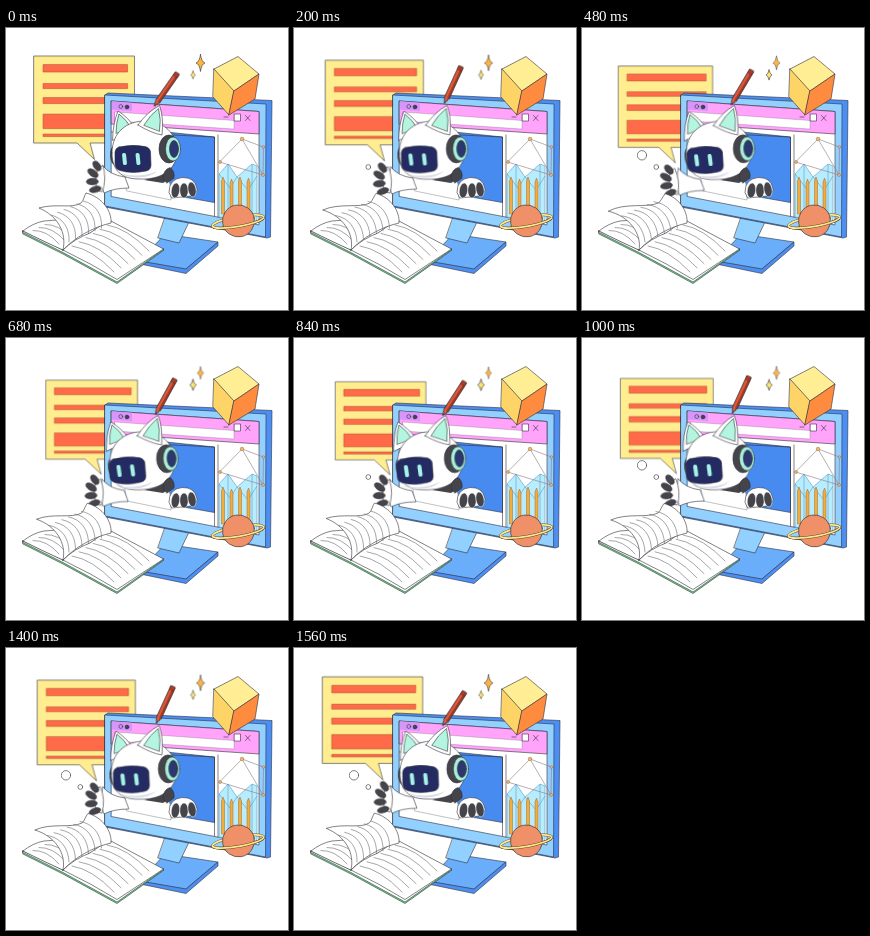
An HTML page for the animation above (1600 ms loop, 282 by 282 pixels).

```html
<!DOCTYPE html>
<html lang="en">
<head>
<meta charset="utf-8">
<title>Robot tutor</title>
<style>
html, body { margin: 0; width: 100%; height: 100%; overflow: hidden; background: #fff; }
svg { display: block; width: 100vw; height: 100vh; }
.ink { stroke: #30303a; stroke-width: .6; stroke-linejoin: round; stroke-linecap: round; }
.line { fill: none; stroke: #30303a; stroke-width: .6; stroke-linecap: round; }
.text { fill: none; stroke: #6b6b70; stroke-width: .6; stroke-linecap: round; }

/* slow drift back and forth */
.drift { animation: 800ms linear infinite alternate; }
#bubble { animation-name: bubble; transform-origin: 162px 183px; }
#head { animation-name: head; transform-origin: 155px 140px; }
#face { animation-name: face; }
#earL { animation-name: earL; }
#earR { animation-name: earR; }
#arm { animation-name: arm; }
#star { animation-name: shrink; transform-origin: 194.5px 35px; }
#spark { animation-name: grow; transform-origin: 187px 47px; }
@keyframes bubble { to { transform: scale(.893); } }
@keyframes head { to { transform: translateX(-2px) rotate(-2.5deg); } }
@keyframes face { to { transform: translate(-4px,.5px); } }
@keyframes earL { to { transform: translate(-4px,-1px); } }
@keyframes earR { to { transform: translate(3px,0); } }
@keyframes arm { to { transform: translate(-1px,4px); } }
@keyframes shrink { to { transform: scale(.68); } }
@keyframes grow { from { transform: scale(.8); } to { transform: scale(1.15); } }

/* twice as fast */
.flap { animation: 400ms linear infinite alternate; }
#hand { animation-name: wave; transform-origin: 99px 152px; }
#leaf { animation-name: leaf; }
.row { animation-name: row; }
@keyframes wave { from { transform: rotate(4deg); } to { transform: translateX(-2px) rotate(-6deg); } }
@keyframes leaf {
  from { d: path("M57 222C61 205 52 188 33 180C50 175 66 181 75 175C78 172 78 168 80 165C96 169 106 183 105 195C87 199 68 210 57 222Z"); }
  to { d: path("M57 222C60 206 46 188 24.5 184C42 174 64 180 77 175C80 172 81 169 84 166C98 170 106 184 105 195C87 199 68 210 57 222Z"); }
}
@keyframes row {
  from { d: path("M45 187C57 190 64 200 63 214"); }
  to { d: path("M38 188C52 189 61 200 63 214"); }
}

#pencil { animation: scribble 200ms linear infinite alternate; }
@keyframes scribble {
  from { transform: translate(148.5px,78px) rotate(35deg); }
  to { transform: translate(150.500px,75px) rotate(24.5deg); }
}

.dot { animation: 533.333ms step-end infinite; }
#dot1 { animation-name: dot1; }
#dot2 { animation-name: dot2; }
@keyframes dot1 { 0% { opacity: 0; } 30% { opacity: 1; } }
@keyframes dot2 { 0% { opacity: 0; } 62% { opacity: 1; } }
</style>
</head>
<body>
<svg viewBox="0 0 282 282">
  <!-- speech bubble -->
  <g id="bubble" class="drift">
    <path class="ink" fill="#ffed8f" d="M28 28H128.500V115H84L88.500 131.500L71 115H28Z"/>
    <path fill="#ff6a48" stroke="#a8482e" stroke-width=".5" d="M37 36.500H121.500V44H37ZM37 55.500H121.500V60.500H37ZM37 69.500H121.500V75.500H37ZM37 86H121.500V100.500H37ZM37 106H121.500V108.500H37Z"/>
  </g>
  <circle id="dot1" class="ink dot" cx="74.300" cy="139" r="2.400" fill="#fff"/>
  <circle id="dot2" class="ink dot" cx="60" cy="127.300" r="4.700" fill="#fff"/>

  <!-- monitor -->
  <path class="ink" fill="#6aaefb" d="M134 233L159 206L212 214L180 241Z"/>
  <path class="ink" fill="#4b8ff5" d="M134 233L180 241L212 214V218L180 245.500L134 236Z"/>
  <path class="ink" fill="#92d0ff" d="M160 187L184 192L173 215L152 210Z"/>
  <path class="ink" fill="#4b8ff5" d="M99 67L102 65L266 72.500L264.500 209L261 210L99 179Z"/>
  <path class="ink" fill="#92d0ff" d="M99 67L260 76L259.500 209L99 178Z"/>
  <path class="ink" fill="#fff" d="M105.500 73L253 83.500V197L105.500 168.500Z"/>
  <path class="ink" fill="#ffa3fb" d="M105.500 73L253 83.500V106L105.500 96Z"/>
  <path fill="#d695f8" d="M106 73.300L126 74.800V83L106 81.500Z"/>
  <path class="ink" fill="#fff" d="M109 84L228 92.500V101L109 93Z" stroke-opacity=".35"/>
  <g class="line">
    <circle cx="114.800" cy="78.500" r="1.900"/>
    <circle cx="121" cy="79" r="1.900" fill="#45405a"/>
    <path d="M218 89H222M239.500 87.500L244 92.500M244 87.500L239.500 92.500"/>
    <path fill="#fff" d="M228.500 86H234.500V93H228.500Z"/>
  </g>
  <path class="ink" fill="#478bf0" d="M160 104L208.500 109V174.500L160 166Z"/>
  <path class="line" d="M105.500 104L208.500 109V188M212 107V189"/>

  <!-- chart -->
  <path fill="#b8edff" stroke="#5a9cc4" stroke-width=".6" d="M213 189V146L222 136L231 149L246 136L251 138V195Z"/>
  <path fill="none" stroke="#5a9cc4" stroke-width=".6" d="M213 146L224 160L231 149L242 162L251 148M222 136V188M246 136V190"/>
  <g fill="#f6ab3f" stroke="#9a6a2c" stroke-width=".5">
    <path id="bar" d="M215.500 186V153L217 149L218.500 153V186Z"/>
    <use href="#bar" x="8.500" y="2"/><use href="#bar" x="17"/><use href="#bar" x="25.500" y="1"/>
  </g>
  <path fill="none" stroke="#8a7a80" stroke-width=".6" d="M213.500 134L236 111L257.500 119M236 111L257 147L213.500 134M257.500 119L257 147"/>
  <g fill="#ffb65a" stroke="#806a60" stroke-width=".5">
    <circle cx="214" cy="134" r="1.500"/><circle cx="236" cy="111" r="1.800"/>
    <circle cx="257.500" cy="119" r="1.300"/><circle cx="257" cy="147" r="1.500"/>
  </g>

  <!-- planet -->
  <g fill="none" transform="rotate(-10 232 193)">
    <ellipse cx="232" cy="193.500" rx="26" ry="5" stroke="#5d4a32" stroke-width="2.800"/>
    <ellipse cx="232" cy="193.500" rx="26" ry="5" stroke="#ffe98a" stroke-width="1.800"/>
    <circle class="ink" cx="232.500" cy="193" r="16" fill="#ef9068"/>
    <path stroke="#5d4a32" stroke-width="2.800" d="M206 193.500A26 5 0 0 0 258 193.500"/>
    <path stroke="#ffe98a" stroke-width="1.800" d="M206 193.500A26 5 0 0 0 258 193.500"/>
  </g>

  <!-- robot -->
  <path class="ink" fill="#fff" d="M119 149Q140 154 158 145Q166 152 165 172L121 163Z" stroke-opacity=".5"/>
  <path fill="#44444a" d="M138 152Q153 149 160 139L166 141Q164 152 157 155Z"/>
  <g id="arm" class="drift">
    <path class="ink" fill="#fff" d="M97 138Q104 147 119 149L123 160Q108 160 98 165Q93 152 97 138Z"/>
    <g id="hand" class="flap">
      <path class="ink" fill="#fff" d="M96 138Q101 151 97 164L92 163Q88 151 91 141Z"/>
      <g fill="#44444a" stroke="#1d1d24" stroke-width=".5">
        <ellipse cx="90" cy="138.500" rx="5.500" ry="3.300" transform="rotate(52 90 138.500)"/>
        <ellipse cx="86.500" cy="146" rx="6" ry="3.200" transform="rotate(32 86.500 146)"/>
        <ellipse cx="86.500" cy="154.500" rx="6" ry="3.200" transform="rotate(-4 86.500 154.500)"/>
        <ellipse cx="90" cy="162" rx="6" ry="3" transform="rotate(-18 90 162)"/>
      </g>
    </g>
  </g>
  <g id="head" class="drift">
    <g id="earL" class="ink drift">
      <path fill="#fff" d="M106.500 112Q107 95 112 83Q122 89 130 101Z"/>
      <path fill="#b4f5df" d="M110 105Q110 95 113 86Q121 92 125 100Z"/>
    </g>
    <path class="ink" fill="#44444a" d="M109 117Q104 119 104.500 128Q105 136 110 138Z"/>
    <path class="ink" fill="#fff" d="M106 125C106 104 121 93 139 93C158 93 171 106 171 123C171 142 155 152 133 151C116 151 106 143 106 125Z"/>
    <g id="earR" class="ink drift">
      <path fill="#fff" d="M132 97Q141 84 153.500 77.500Q158 90 156 107Q145 105 132 97Z"/>
      <path fill="#b4f5df" d="M138 97Q144 87 152.500 80.500Q155.500 92 153.500 103Z"/>
    </g>
    <g id="face" class="drift">
      <path fill="#d9dce8" d="M114 145Q132 151 152 143Q143 150 131 149.500Q120 149 114 145Z"/>
      <path class="ink" fill="#232b62" stroke-width="1" d="M113 119Q126 116 139 118.500Q144 119.500 144.500 124L145 137Q145 142 140 143Q126 146 114 142.500Q109 141 109 136L109 124Q109.500 120 113 119Z"/>
      <g fill="#a6f2e6">
        <rect x="116.500" y="125" width="4" height="12" rx="1.800" transform="rotate(-6 118.500 131)"/>
        <rect x="130" y="125" width="4" height="12" rx="1.800" transform="rotate(-6 132 131)"/>
      </g>
    </g>
    <ellipse class="ink" cx="163" cy="121" rx="10" ry="14" fill="#44444a"/>
    <ellipse class="ink" cx="167" cy="121" rx="7.500" ry="12" fill="#a9f0da"/>
    <ellipse class="ink" cx="168" cy="121" rx="4.500" ry="8.500" fill="#2b376f"/>
  </g>
  <g class="ink">
    <path fill="#44444a" d="M157 150Q157 142 164 139.500Q169 143 168 150L161 155Z"/>
    <path fill="#fff" d="M163 164Q163 151 176 149.500Q189 149 191 161Q190 168 185 168L166 170Z"/>
  </g>
  <g fill="#44444a" stroke="#fff" stroke-width=".5">
    <ellipse cx="169.500" cy="162.500" rx="4.200" ry="7.500" transform="rotate(8 169.500 162.500)"/>
    <ellipse cx="178" cy="162.500" rx="4.200" ry="7.500"/>
    <ellipse cx="186" cy="161.500" rx="4" ry="7.500" transform="rotate(-10 186 161.500)"/>
  </g>

  <!-- cube, sparkles, pencil -->
  <g class="ink">
    <path fill="#ffee94" d="M208 41L232 28.500L253 46L228 63Z"/>
    <path fill="#ffd467" d="M208 41L228 63L223 87L207 69Z"/>
    <path fill="#ff8c3e" d="M228 63L253 46L249 71L223 87Z"/>
    <path id="star" class="drift" fill="#ffb43e" d="M194.500 26.500Q195.500 34 199 35Q195.500 36 194.500 43.500Q193.500 36 190 35Q193.500 34 194.500 26.500Z"/>
    <path id="spark" class="drift" fill="#ffe36e" d="M187 42Q187.700 46 190 47Q187.700 48 187 52Q186.300 48 184 47Q186.300 46 187 42Z"/>
    <g id="pencil" stroke-width=".9">
      <path fill="#f5572f" d="M-2.300 -6V-40H2.300V-6L0 0Z"/>
      <path fill="#b8391f" d="M.700 -6V-36H2.300V-6ZM-2.300 -36H2.300V-40H-2.300Z" stroke-width=".4"/>
    </g>
  </g>

  <!-- book -->
  <path class="ink" fill="#6ee68a" d="M17 203L57 222.500L105 194L158 222L111 255.500L57 226L17 206Z"/>
  <path class="ink" fill="#fff" d="M17 203L57 222L158 221L111 254L57 224.500L17 204.500Z" stroke-width=".3"/>
  <g class="ink" fill="#fff" stroke-width=".5">
    <path d="M17 203Q27 195 38 193Q62 190 100 195L57 222Q39 214 17 203Z"/>
    <path d="M57 222Q68 211 84 205Q95 196 105 193L157.500 221L111 251.500Q86 236 57 222Z"/>
  </g>
  <g class="text">
    <path id="left" d="M27 202.500Q41 202 53 216"/>
    <use href="#left" x="6" y="-3"/><use href="#left" x="12" y="-6"/>
    <path id="right" d="M66 218Q86 221 108 244"/>
    <use href="#right" x="7" y="-4.200"/><use href="#right" x="14" y="-8.400"/><use href="#right" x="21" y="-12.600"/>
    <use href="#right" x="28" y="-16.800"/><use href="#right" x="35" y="-21"/>
  </g>
  <path id="leaf" class="ink flap" fill="#fff" d="M57 222C61 205 52 188 33 180C50 175 66 181 75 175C78 172 78 168 80 165C96 169 106 183 105 195C87 199 68 210 57 222Z"/>
  <g class="text">
    <path class="row flap" d="M45 187C57 190 64 200 63 214"/>
    <g transform="translate(6.500 -2.800)"><path class="row flap" d="M45 187C57 190 64 200 63 214"/></g>
    <g transform="translate(13 -5.600)"><path class="row flap" d="M45 187C57 190 64 200 63 214"/></g>
    <g transform="translate(19.500 -8.400)"><path class="row flap" d="M45 187C57 190 64 200 63 214"/></g>
    <g transform="translate(26 -11.200)"><path class="row flap" d="M45 187C57 190 64 200 63 214"/></g>
    <g transform="translate(32.500 -14)"><path class="row flap" d="M45 187C57 190 64 200 63 214"/></g>
  </g>
</svg>
</body>
</html>
```
